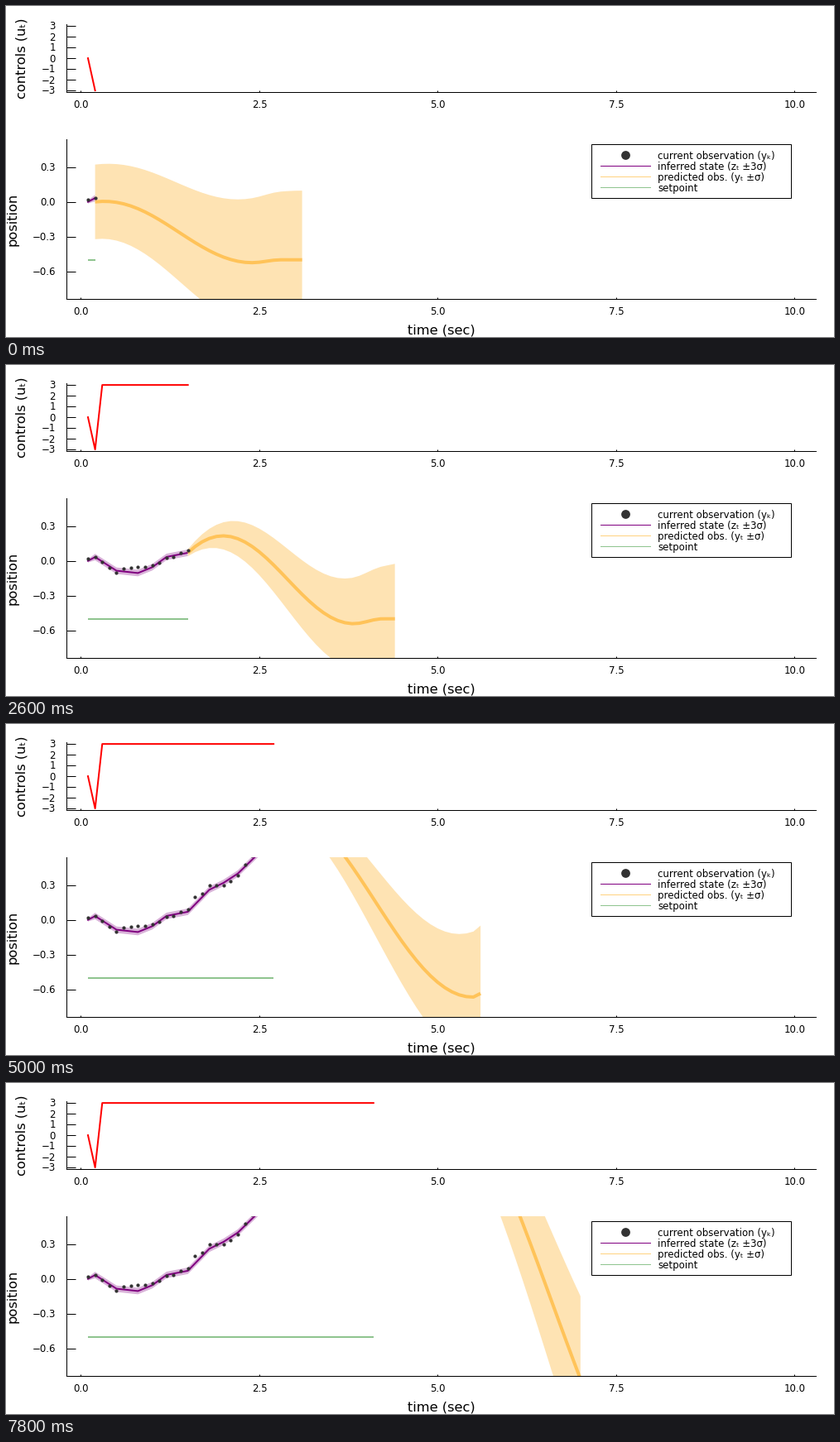
A matplotlib script for the animation above (8000 ms loop, 1000 px wide and 400 px high).

```python
import numpy as np
import matplotlib.pyplot as plt
from matplotlib.animation import FuncAnimation
from matplotlib.patches import Rectangle

W, H, DPI = 1000, 400, 100
FRAMES, INTERVAL = 40, 200
PX = 72 / DPI                       # points per pixel
TICK_PX, LABEL_PX = 11.8, 16.26
XLIM = (-0.197, 10.297)
SETPOINT = -0.5
ORANGE, ORANGE_FILL = "#ffc359", "#fee3b3"
GREEN, DOT = "#8fc48f", "#333333"

plt.rcParams["font.family"] = "DejaVu Sans"

DT = 0.1
times = DT * np.arange(1, FRAMES + 2)
horizon = DT * np.arange(30)

# Filtered path through its bends; it leaves the view after 2.5 s
state_t = [.1, .2, .5, .8, 1.0, 1.2, 1.5, 1.8, 2.0, 2.2, 2.5]
state_x = [0, .033, -.085, -.105, -.055, .034, .07, .26, .32, .4, .58]
inferred = np.interp(times[:25], state_t, state_x)

# Measurements: a slow wave and a little noise around the path
rng = np.random.default_rng(4)
k = np.arange(1, 25)
wave = .015 - .035 * np.cos(2 * np.pi * (k - 3.5) / 8.7)
observed = inferred[:24] + wave + rng.normal(0, .008, 24)

# Key plans: step, peak time, fall time, peak height, lowest point
PLANS = np.array([
    (0, .15, 2.05, 0, -.525),
    (4, -.35, 1.3, -.03, -.53),
    (10, .33, 1.67, .06, -.53),
    (16, .6, 2.05, .393, -.555),
    (21, .28, 2.18, .467, -.568),
    (30, -.2, 3.4, 1.62, -.79),
    (39, .5, 4.0, 1.95, -2.35),
])


def smoothstep(u):
    u = np.clip(u, 0, 1)
    return u * u * (3 - 2 * u)


def predicted_mean(n):
    """Cosine fall from the peak, then a short settle at the setpoint."""
    peak_t, fall_t, peak, low = (np.interp(n, PLANS[:, 0], col)
                                 for col in PLANS.T[1:])
    u = np.minimum((horizon - peak_t) / fall_t, 1)
    mean = low + (peak - low) * (1 + np.cos(np.pi * u)) / 2
    settle = smoothstep((horizon - peak_t - fall_t) / .4)
    mean += (SETPOINT - low) * settle
    if n < len(inferred):
        # Start where the previous two states point to
        start = 2 * inferred[n] - inferred[max(n - 1, 0)]
        mean += (start - mean[0]) * np.exp(-3 * horizon)
    return mean


def predicted_spread(n):
    if n == 0:                      # prior uncertainty, nothing learned yet
        return .322 + .275 * smoothstep(horizon / horizon[-1])
    return .03 + .18 * horizon + (.0011 * n - .0235) * horizon ** 2


def band(x, mid, half):
    return np.column_stack([np.r_[x, x[::-1]],
                            np.r_[mid - half, (mid + half)[::-1]]])


fig = plt.figure(figsize=(W / DPI, H / DPI), dpi=DPI, facecolor="white")


def make_axes(top, bottom, ylim, yticks):
    ax = fig.add_axes([73.4 / W, 1 - bottom / H, .9046, (bottom - top) / H])
    ax.set(xlim=XLIM, ylim=ylim, xticks=np.arange(5) * 2.5, yticks=yticks)
    ax.patch.set_visible(False)
    ax.spines[["top", "right"]].set_visible(False)
    ax.spines[["left", "bottom"]].set_linewidth(PX)
    ax.tick_params(direction="in", width=PX, labelleft=False,
                   labelbottom=False)
    ax.tick_params(axis="x", length=2.5 * PX)
    ax.tick_params(axis="y", length=10.5 * PX)
    return ax


ax_u = make_axes(21.8, 104.4, (-3.18, 3.18), range(-3, 4))
ax_y = make_axes(161.4, 354, (-.838, .538), [-.6, -.3, 0, .3])

# Pixel-space layer for text and legend
stage = fig.add_axes([0, 0, 1, 1])
stage.set(xlim=(0, W), ylim=(H, 0))
stage.axis("off")


def text(x, y, s, size=TICK_PX, ha="center", va="baseline", **kw):
    stage.text(x, y, s.replace("-", "\u2212"), fontsize=size * PX, ha=ha,
               va=va, **kw)


for i in range(5):
    for y in (122.8, 372.7):
        text(90.5 + 215.5 * i, y, f"{2.5 * i:.1f}")
for v in range(-3, 4):
    text(60, 67.5 - 13 * v, str(v), ha="right")
for v in (-.6, -.3, 0, .3):
    text(60, 240.9 - 140 * v, f"{v:.1f}", ha="right")

text(526, 396.3, "time (sec)", LABEL_PX)
text(19.5, 63, "controls (uₜ)", LABEL_PX, va="center", rotation=90)
text(7.7, 257.7, "position", LABEL_PX, va="center", rotation=90)

stage.add_patch(Rectangle((707.4, 167.4), 240.5, 64.8, fc="white",
                          ec="black", lw=PX))
rows = [("current observation (yₖ)", None),
        ("inferred state (zₜ ±3σ)", "purple"),
        ("predicted obs. (yₜ ±σ)", "#ffd280"),
        ("setpoint", GREEN)]
for i, (name, color) in enumerate(rows):
    y = 180.4 + 12.9 * i
    text(787, y + 4.5, name, ha="left")
    if color:
        stage.plot([718, 777.5], [y, y], color=color, lw=PX)
    else:
        stage.plot(747.8, y, "o", color=DOT, ms=10.8 * PX, mew=0)

control_line, = ax_u.plot([], [], color="red", lw=2 * PX)
setpoint_line, = ax_y.plot([], [], color=GREEN, lw=2 * PX,
                           solid_capstyle="butt")
state_band, = ax_y.fill([0], [0], color="#d9b3d9", lw=0, zorder=2)
state_line, = ax_y.plot([], [], color="purple", lw=2 * PX, zorder=3)
plan_band, = ax_y.fill([0], [0], color=ORANGE_FILL, lw=0, zorder=4)
plan_line, = ax_y.plot([], [], color=ORANGE, lw=4 * PX, zorder=5,
                       solid_capstyle="butt")
dots, = ax_y.plot([], [], "o", color=DOT, ms=4.2 * PX, mew=0, zorder=6)


def update(n):
    t = times[:n + 2]
    u = np.full(len(t), 3)
    u[:2] = 0, -3
    control_line.set_data(t, u)
    setpoint_line.set_data([t[0], t[-1]], [SETPOINT, SETPOINT])

    z, y = inferred[:len(t)], observed[:len(t)]
    state_line.set_data(t[:len(z)], z)
    half = .028 * smoothstep(t[:len(z)] / .2)
    state_band.set_xy(band(t[:len(z)], z, half))
    dots.set_data(t[:len(y)], y)

    future = t[-1] + horizon
    mean = predicted_mean(n)
    plan_line.set_data(future, mean)
    plan_band.set_xy(band(future, mean, predicted_spread(n)))
    return (control_line, setpoint_line, state_line, state_band, dots,
            plan_line, plan_band)


anim = FuncAnimation(fig, update, frames=FRAMES, interval=INTERVAL,
                     repeat=True, repeat_delay=0, blit=False)
plt.show()
```
